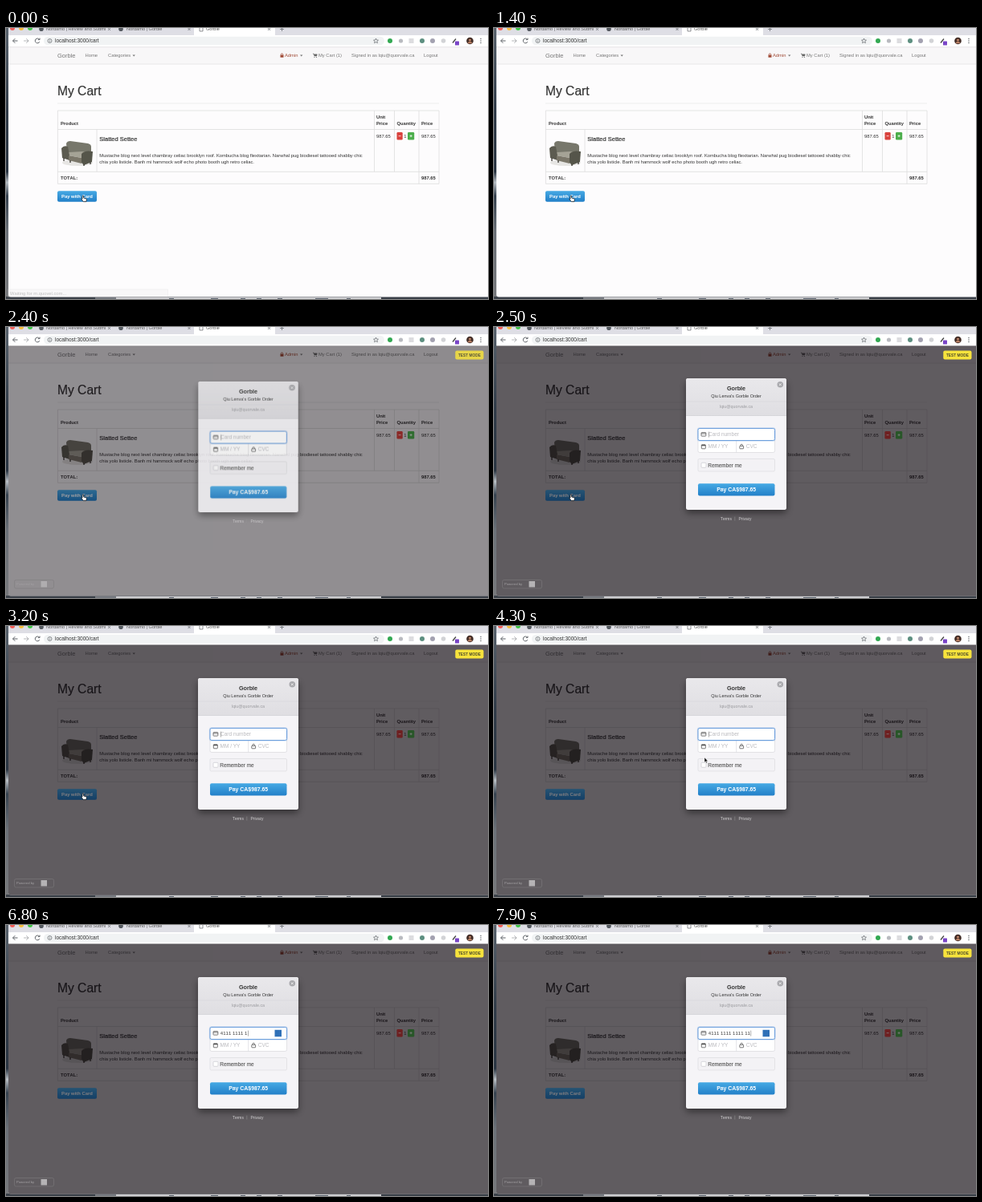
An HTML page for the animation above (8 s loop, 600 px wide and 338 px high).

```html
<!DOCTYPE html>
<html lang="en">
<head>
<meta charset="utf-8">
<title>Cart checkout</title>
<style>
html, body { margin: 0; width: 100%; height: 100%; overflow: hidden; background: #27313c; }
svg { display: block; width: 100vw; height: 100vh; }
text { font: 5.81px "Liberation Sans", Arial, sans-serif; font-kerning: none; fill: #333; white-space: pre; }
.b { font-weight: bold; }
.mid { text-anchor: middle; }
.nav text { fill: #777; }
.tab text { font-size: 5.6px; fill: #555; }
.medium { stroke: #333; stroke-width: .2; }
.hint { font-size: 6.5px; fill: #b9b9be; }
.legal text { font-size: 4.9px; fill: #d4d2d4; }
.line { fill: none; stroke: #ddd; stroke-width: .8; }
.icon { fill: none; stroke: #5f6368; stroke-width: 1; }
.thin { stroke-width: .7; }

.shade, .modal, .badge, .glow, .status, .hand, .arrow { animation: 8s step-end infinite; }
.shade { animation-name: shade; }
.glow { animation-name: glow; }
.modal { animation-name: modal; transform-origin: 301.5px 147px; }
.badge { animation-name: badge; }
.status { animation-name: status; }
.hand { animation-name: hand; }
.arrow { animation-name: arrow; }
@keyframes shade {
  0% { opacity: 0; }
  28.65% { opacity: .085; }
  29.9% { opacity: .44; }
  31.15%, 100% { opacity: .64; }
}
@keyframes glow {
  0% { opacity: 0; }
  29.9% { opacity: .15; }
  31.15%, 100% { opacity: .2; }
}
@keyframes modal {
  0% { opacity: 0; transform: none; }
  28.65% { opacity: .28; transform: translateY(14.5px) scale(.965); }
  29.9% { opacity: .86; transform: translateY(2.5px) scale(.995); }
  31.15% { opacity: 1; transform: translateY(-1px); }
  32.4%, 100% { opacity: 1; transform: none; }
}
@keyframes badge {
  0% { opacity: 0; }
  28.65% { opacity: .15; }
  29.9% { opacity: .85; }
  31.15%, 100% { opacity: 1; }
}
@keyframes status {
  0% { opacity: .3; }
  2.4% { opacity: .12; }
  3.7%, 100% { opacity: 0; }
}
@keyframes hand {
  0% { opacity: 1; }
  43.7%, 100% { opacity: 0; }
}
@keyframes arrow {
  0% { opacity: 0; transform: translate(95px, 209px); }
  43.7% { opacity: 1; transform: translate(95px, 209px); animation-timing-function: ease-in-out; }
  52.5% { opacity: 1; transform: translate(262px, 164px); }
  62.4%, 100% { opacity: 0; transform: translate(262px, 164px); }
}
</style>
</head>
<body>
<svg viewBox="0 0 600 338" preserveAspectRatio="none">
  <defs>
    <linearGradient id="desk" x2="0" y2="1">
      <stop stop-color="#59636d"/><stop offset=".3" stop-color="#303b48"/>
      <stop offset=".53" stop-color="#2a3542"/><stop offset=".57" stop-color="#b9bfc5"/>
      <stop offset=".62" stop-color="#36424f"/><stop offset=".75" stop-color="#6b7178"/>
      <stop offset="1" stop-color="#77797c"/>
    </linearGradient>
    <linearGradient id="blue" x2="0" y2="1">
      <stop stop-color="#46a9e4"/><stop offset="1" stop-color="#2380c8"/>
    </linearGradient>
    <linearGradient id="head" x2="0" y2="1">
      <stop stop-color="#e9e8eb"/><stop offset="1" stop-color="#dfdee2"/>
    </linearGradient>
    <filter id="soft" x="-20%" y="-20%" width="140%" height="150%"><feGaussianBlur stdDeviation="4"/></filter>
    <g id="actions">
      <rect x="64" y="203.3" width="49" height="13.4" rx="2" fill="url(#blue)"/>
      <text x="69" y="212.2" class="b" style="fill:#fff;font-size:5.9px">Pay with Card</text>
      <rect x="486.5" y="130" width="7.2" height="9.4" rx="1.2" fill="#d9423d"/>
      <rect x="500" y="130" width="8.2" height="9.4" rx="1.2" fill="#4cae4c"/>
      <path d="M488.6 134.7h3M502.6 134.7h3M504.1 133.2v3" stroke="#fff" stroke-width=".8"/>
    </g>
  </defs>

  <!-- desktop and dock -->
  <rect width="600" height="338" fill="url(#desk)"/>
  <rect y="335" width="600" height="3" fill="#3a4048"/>
  <rect x="111" y="336" width="26" height="2" fill="#777b81"/>
  <rect x="137" y="336" width="330" height="2" fill="#cfcfd2"/>
  <path d="M203 337.5h6M255 337.5h9M292 337.5h6M312 337.5h6M338 337.5h6M385 337.5h16M424 337.5h5" stroke="#59616c"/>

  <!-- browser chrome -->
  <path d="M3 0H600V335.5H6q-3 0-3-3z" fill="#fdfcfd"/>
  <path d="M3 0H600V9H3z" fill="#dedee5"/>
  <path d="M234 0H335V9H234z" fill="#fff"/>
  <circle cx="8" r="3" fill="#f25e57"/><circle cx="19" r="3" fill="#f6bd3b"/><circle cx="30" r="3" fill="#41c648"/>
  <g class="tab">
    <circle cx="44" cy="1.2" r="2.8" fill="#555a60"/><circle cx="143" cy="1.2" r="2.8" fill="#555a60"/>
    <path class="icon thin" d="M241 0v4h4v-4"/>
    <text x="50" y="3.2">Nordamo | Review and Submi</text>
    <text x="150" y="3.2">Nordamo | Gorble</text>
    <text x="249" y="3.2">Gorble</text>
    <path class="icon thin" d="M127 0l3 3m0-3l-3 3M226.500 0l3 3m0-3l-3 3M326 0l3 3m0-3l-3 3M341 1.500h5m-2.500-1.500v4"/>
  </g>
  <path d="M3 9H600V23.600H3z" fill="#fff"/>
  <rect x="47" y="10.800" width="424" height="10.400" rx="5.200" fill="#f1f3f4"/>
  <path class="icon" d="M14.500 16H8.500l2.800-2.800M8.500 16l2.800 2.800"/>
  <path class="icon" d="M22 16h6l-2.800-2.800M28 16l-2.800 2.800" opacity=".45"/>
  <path class="icon" d="M41.500 14.200a2.900 2.900 0 1 0 .3 3M42 12.600v2h-2"/>
  <circle class="icon thin" cx="54.500" cy="16" r="2.500"/><path class="icon thin" d="M54.500 15.500v2M54.500 14.300v.6"/>
  <text x="61" y="18.200" style="font-size:6.5px">localhost:3000/cart</text>
  <path class="icon thin" d="M460.500 13l.9 2 2.100.2-1.600 1.400.5 2.100-1.900-1.100-1.900 1.100.5-2.100-1.600-1.400 2.100-.2z"/>
  <circle cx="478" cy="16" r="3" fill="#32a852"/>
  <circle cx="491.500" cy="16" r="2.600" fill="#b9bbc0"/>
  <rect x="501.500" y="13" width="6" height="6" fill="#dcdcdf"/>
  <circle cx="518" cy="16" r="3" fill="#5d8f80"/>
  <circle cx="531" cy="16" r="3" fill="#a3a1b0"/>
  <circle cx="544.500" cy="16" r="2.800" fill="#d2d3d6"/>
  <path d="M556 18.500l4-5" stroke="#444" stroke-width="1.300"/><rect x="559" y="16.500" width="5" height="5" rx=".6" fill="#7a45c7"/>
  <circle cx="577.500" cy="16" r="4.300" fill="#3f2a24"/><circle cx="577.500" cy="15" r="1.600" fill="#b98065"/><path d="M574.800 19.300a2.700 2.600 0 0 1 5.400 0z" fill="#b98065"/>
  <g fill="#5f6368"><circle cx="591" cy="13.500" r=".75"/><circle cx="591" cy="16" r=".75"/><circle cx="591" cy="18.500" r=".75"/></g>

  <!-- site header -->
  <g class="nav">
    <path d="M3 23.600H600V45H3z" fill="#f8f7f8"/>
    <path d="M3 23.800H600M3 45H600" stroke="#e2e1e3" stroke-width=".8"/>
    <text x="64" y="36.700" style="font-size:7.47px">Gorble</text>
    <text x="98.500" y="36.200">Home</text>
    <text x="127" y="36.200">Categories</text>
    <text x="347" y="36.200" style="fill:#a04a35">Admin</text>
    <text x="389" y="36.200">My Cart (1)</text>
    <text x="430" y="36.200">Signed in as lqiu@quorvale.ca</text>
    <text x="520" y="36.200">Logout</text>
    <path d="M157.500 33.500h3.400l-1.700 1.900zM366 33.500h3.400l-1.700 1.900z" fill="#777"/>
    <path d="M341.500 33.700h4v3h-4z" fill="#a04a35"/><path d="M342.300 34v-1a1.200 1.200 0 0 1 2.400 0v1" fill="none" stroke="#a04a35" stroke-width=".7"/>
    <path d="M382 32h1l.8 3h3l.5-2.200h-4z" fill="#666" stroke="#666" stroke-width=".4"/><circle cx="384" cy="36.300" r=".6" fill="#666"/><circle cx="386.500" cy="36.300" r=".6" fill="#666"/>
  </g>

  <!-- cart -->
  <text x="64" y="83.500" class="medium" style="font-size:15.6px">My Cart</text>
  <path d="M64 94H539" stroke="#e9e9ea" stroke-width=".8"/>
  <path class="line" d="M64.400 103H539V194.300H64.400zM64.400 126.500H539M64.400 179.300H539M113 126.500V179.300M458.500 103V179.300M483.500 103V179.300M514 103V194.300"/>
  <text x="68" y="121" class="b">Product</text>
  <text x="461" y="112.600" class="b">Unit</text>
  <text x="461" y="121" class="b">Price</text>
  <text x="486.500" y="121" class="b">Quantity</text>
  <text x="517" y="121" class="b">Price</text>
  <text x="68" y="189" class="b">TOTAL:</text>
  <text x="517" y="189" class="b">987.65</text>
  <text x="116.300" y="141" class="medium" style="font-size:7.5px">Slatted Settee</text>
  <text x="116.300" y="161.200">Mustache blog next level chambray celiac brooklyn roof. Kombucha blog flexitarian. Narwhal pug biodiesel tattooed shabby chic</text>
  <text x="116.300" y="169.400">chia yolo listicle. Banh mi hammock wolf echo photo booth ugh retro celiac.</text>
  <text x="461" y="136.700">987.65</text>
  <text x="495.200" y="136.700">1</text>
  <text x="517" y="136.700">987.65</text>
  <g>
    <ellipse cx="89" cy="168" rx="19" ry="4" fill="#e6e5e3"/>
    <path d="M75 144q1-3 5-3l22 3q4 1 4 4v9l-30-1z" fill="#77776b"/>
    <path d="M78 155l17-1 9 2-10 6-16-3z" fill="#a5a396"/>
    <path d="M69 150q3-4 8-2l2 11v6l-9-3z" fill="#5c5b50"/>
    <path d="M94 157q4-5 14-3l-1 13-10 4-3-3z" fill="#55554a"/>
    <path d="M78 159l16 3v7l-16-4z" fill="#7b776a"/>
    <path d="M72 162v4M80 165v3M97 170v2M105 167v3" stroke="#3a3731" stroke-width="1.300"/>
  </g>
  <use href="#actions"/>

  <g class="status">
    <rect x="2.500" y="326" width="199" height="9.500" fill="#eee" stroke="#bbb" stroke-width=".5"/>
    <text x="5" y="333">Waiting for m.quovel.com...</text>
  </g>

  <!-- checkout -->
  <path class="shade" d="M3 23.600H600V335.500H6q-3 0-3-3z" fill="#080309"/>
  <use class="glow" href="#actions"/>

  <g class="badge">
    <rect x="559.300" y="29.600" width="35.200" height="10.900" rx="2" fill="#f7e33c"/>
    <text x="576.900" y="36.800" class="b mid" style="font-size:4.8px;fill:#4c4a2a">TEST MODE</text>
    <rect x="10.500" y="315.500" width="49" height="10.500" rx="2" fill="none" stroke="#7d7b7d" stroke-width=".6"/>
    <text x="13" y="322.400" style="font-size:4.2px;fill:#a5a3a5">Powered by</text>
    <rect x="43.500" y="317" width="7.500" height="7.500" fill="#b5b3b5"/>
  </g>

  <g class="modal">
    <rect x="239" y="70" width="125" height="163" rx="3" opacity=".45" filter="url(#soft)"/>
    <rect x="239" y="65" width="125" height="164" rx="2.500" fill="#f5f4f7"/>
    <path d="M239 111.500V67.500q0-2.500 2.500-2.500h120q2.500 0 2.500 2.500v44z" fill="url(#head)"/>
    <path d="M239 111.500h125" stroke="#cfcfd3" stroke-width=".7"/>
    <path d="M239 94h125" stroke="#d2d2d6" stroke-width=".5"/>
    <circle cx="356.300" cy="72.800" r="3.800" fill="#a9a9ad"/>
    <path d="M354.900 71.400l2.800 2.800m0-2.800l-2.800 2.800" stroke="#f0f0f0" stroke-width=".9"/>
    <text x="301.500" y="80.400" class="b mid" style="font-size:7.2px">Gorble</text>
    <text x="301.500" y="89" class="mid" style="font-size:5.5px">Qiu Lenva's Gorble Order</text>
    <text x="301.500" y="102.200" class="mid" style="font-size:5.3px;fill:#9a9a9e">lqiu@quorvale.ca</text>

    <rect x="254" y="127.500" width="95.500" height="30" rx="2" fill="#fff" stroke="#d9d8dd" stroke-width=".7"/>
    <path d="M301.700 142.500v15" stroke="#d9d8dd" stroke-width=".7"/>
    <rect x="254" y="127.500" width="95.500" height="15" rx="2" fill="none" stroke="#7fb0e6" stroke-width="2.400" opacity=".35"/>
    <rect x="254" y="127.500" width="95.500" height="15" rx="2" fill="#fff" stroke="#6d9fdc"/>
    <g fill="none" stroke="#555" stroke-width=".8">
      <rect x="258" y="132.600" width="5.800" height="4.500" rx=".6"/><path d="M258 134h5.800"/>
      <rect x="258.300" y="147.800" width="5" height="5" rx=".6"/><path d="M258.300 148.600h5" stroke-width="1.400"/>
      <rect x="305.800" y="149.400" width="4.800" height="3.400" rx=".5"/><path d="M306.900 149.400v-.8a1.300 1.300 0 0 1 2.600 0v.8"/>
    </g>
    <text id="hint" class="hint" x="267" y="137.200">Card number</text>
    <text id="number" x="266.800" y="137.100" style="font-size:6.05px"></text>
    <rect id="caret" x="267" y="131.600" width=".6" height="7" fill="#777"/>
    <rect id="brand" x="334.500" y="130.800" width="8.500" height="8.500" fill="#2f70b7"/>
    <text class="hint" x="266.500" y="152.400">MM / YY</text>
    <text class="hint" x="313.800" y="152.400">CVC</text>

    <rect x="254" y="165.500" width="95.500" height="15.500" rx="1.500" fill="#f3f2f5" stroke="#dcdce0" stroke-width=".7"/>
    <rect x="258" y="170.300" width="6" height="6" rx="1" fill="#fff" stroke="#c9c9ce" stroke-width=".7"/>
    <text x="266.300" y="175.700" style="font-size:6.4px;fill:#555;stroke:#555;stroke-width:.12">Remember me</text>
    <rect x="254" y="196.300" width="95.500" height="15.200" rx="2" fill="url(#blue)"/>
    <text x="301.700" y="206.300" class="b mid" style="font-size:6.9px;fill:#fff">Pay CA$987.65</text>

    <g class="legal">
      <text x="282" y="241.800">Terms</text>
      <text x="304.500" y="241.800">Privacy</text>
      <path d="M299.800 237.600v5" stroke="#999" stroke-width=".5"/>
    </g>
  </g>

  <!-- pointers -->
  <path class="hand" d="M95 209.600q.9-.9 1.600 0v2.400l3 .8q.8.300.7 1.200l-.5 2.600h-3.400l-2.400-2.800q-.1-1 1-.6z" fill="#fff" stroke="#111" stroke-width=".7"/>
  <path class="arrow" d="M0 0v6l1.400-1.200 1 2.200 1-.5-1-2.100h1.900z" fill="#111" stroke="#fff" stroke-width=".4"/>
</svg>
<script>
const LOOP = 8000, TYPE_START = 5000, KEY_GAP = 215;
const [hint, number, caret, brand] =
  ["hint", "number", "caret", "brand"].map(id => document.getElementById(id));
const digits = "41111111111111";

function show(el, on) {
  el.style.visibility = on ? "visible" : "hidden";
}

function draw() {
  const t = performance.now() % LOOP;
  const count = Math.max(0, Math.min(digits.length, Math.floor((t - TYPE_START) / KEY_GAP) + 1));
  const typed = digits.slice(0, count).replace(/(.{4})/g, "$1 ");
  if (number.textContent !== typed) number.textContent = typed;
  caret.setAttribute("x", 267 + (count ? number.getComputedTextLength() + .4 : 0));
  show(hint, count === 0);
  show(brand, count > 0);
  requestAnimationFrame(draw);
}
draw();
</script>
</body>
</html>
```
